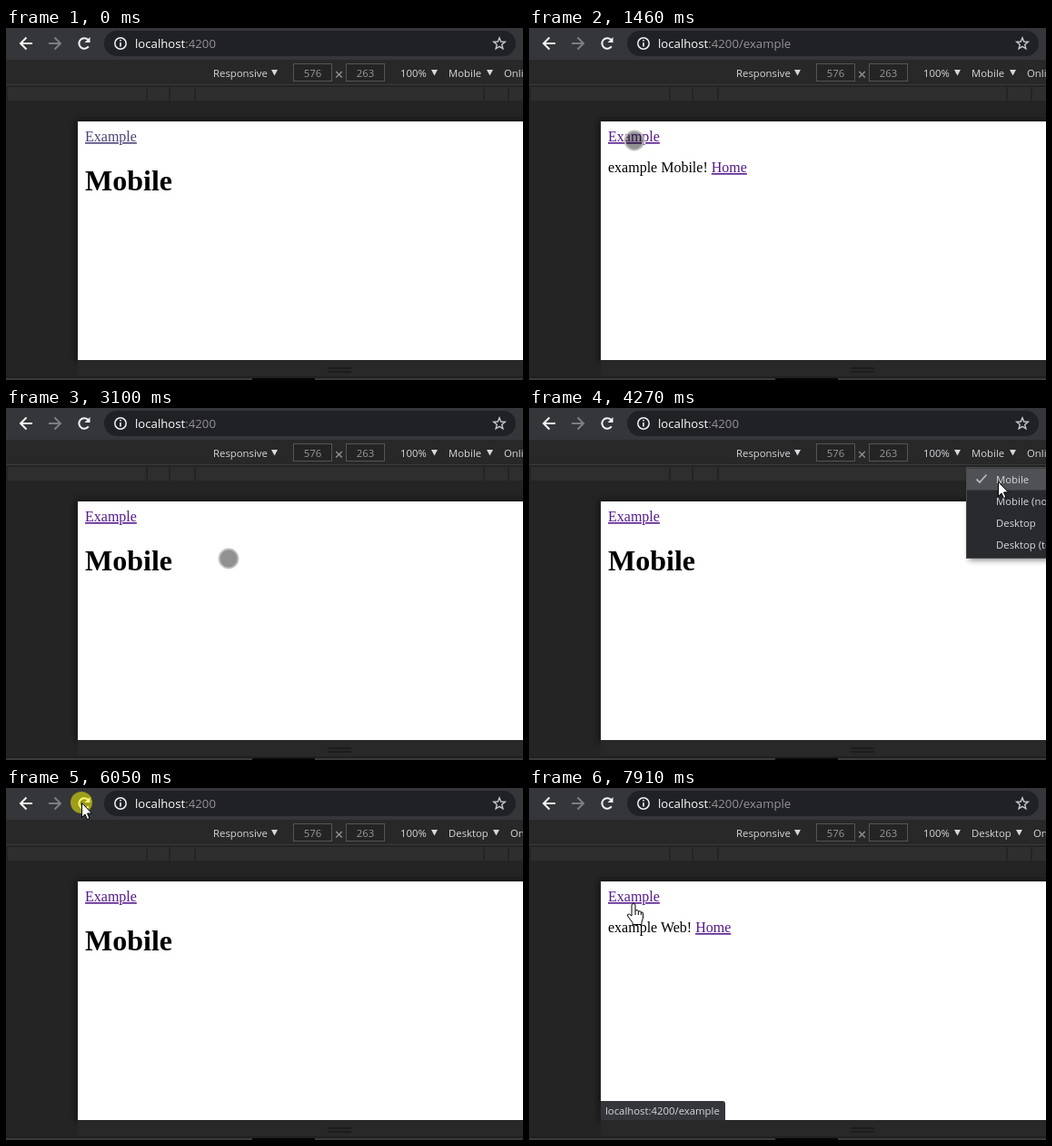
Write an HTML page that moves like this. It is 569 px wide and 388 px high and loops after 8000 ms.

```html
<!DOCTYPE html>
<html lang="en">
<head>
<meta charset="utf-8">
<title>Responsive browser demo</title>
<style>
html, body { margin: 0; width: 100%; height: 100%; overflow: hidden; background: #242424; }
svg { display: block; width: 569px; height: 388px; }
.ui { font: 11.35px "Open Sans", "Noto Sans", sans-serif; fill: #d5d8dc; }
.ui .dim { fill: #96999d; }
.url { font-size: 13.2px; fill: #fff; }
.page { font: 16px "Liberation Serif", "Times New Roman", serif; fill: #000; }
.link { fill: #551a8b; text-decoration: underline; }
.big { font-size: 32px; font-weight: bold; }
</style>
</head>
<body>
<svg viewBox="0 0 569 388" xmlns="http://www.w3.org/2000/svg">
  <defs>
    <filter id="soft" x="-10%" y="-10%" width="120%" height="120%"><feGaussianBlur stdDeviation="3"/></filter>
  </defs>
  <rect width="569" height="388" fill="#242424"/>

  <!-- browser bar -->
  <rect width="569" height="35" fill="#35363a"/>
  <rect x="108" y="3" width="453" height="28" rx="14" fill="#202124"/>
  <g fill="none" stroke="#f1f3f4" stroke-width="2">
    <path d="M29 17H16.5M22.5 10.5L16 17L22.5 23.5"/>
    <path d="M47 17H59.5M53.5 10.5L60 17L53.5 23.5" stroke="#7d7e82"/>
    <path d="M90.8 20.4A5.8 5.8 0 1 1 90.2 12.8"/>
    <path d="M92.5 10V16H86.5Z" fill="#f1f3f4" stroke="none"/>
    <circle cx="126" cy="17" r="6.2" stroke-width="1.5"/>
    <path d="M126 16V20.4M126 13V14.6" stroke-width="1.6"/>
    <path id="star" stroke="#c5c8cc" stroke-width="1.4"/>
  </g>
  <text class="ui url" x="142" y="22" style="font-size:13.2px;fill:#fff">localhost<tspan id="path" fill="#97909b"></tspan></text>

  <!-- device toolbar -->
  <rect y="35" width="569" height="27" fill="#282828"/>
  <rect y="62" width="569" height="1" fill="#3b3b3b"/>
  <g id="ruler" fill="#2e2e2e"></g>
  <g fill="#242424" stroke="#555">
    <rect x="316.5" y="39.5" width="42" height="19"/>
    <rect x="374.5" y="39.5" width="42" height="19"/>
  </g>
  <g class="ui">
    <text x="228" y="54">Responsive</text>
    <text class="dim" x="337.5" y="54" text-anchor="middle">576</text>
    <text class="dim" x="395.5" y="54" text-anchor="middle">263</text>
    <text x="434" y="54">100%</text>
    <text id="device" x="487" y="54"></text>
    <text id="network" y="54">Online</text>
  </g>
  <path d="M363.2 48l6.6 6.6m0-6.6l-6.6 6.6" stroke="#8d9094" stroke-width="1.4"/>
  <g fill="#d5d8dc">
    <path d="M292 46h7l-3.5 6.5Z"/>
    <path d="M468 46h7l-3.5 6.5Z"/>
    <path id="deviceTri" d="M0 46h7l-3.5 6.5Z"/>
  </g>

  <!-- viewport -->
  <rect x="77" y="101" width="510" height="267" fill="#0c0c0c" opacity=".55" filter="url(#soft)"/>
  <rect x="79" y="366" width="490" height="18" fill="#282828"/>
  <path d="M354 375h26m-26 4h26" stroke="#181818" stroke-width="1.6"/>
  <rect y="384" width="569" height="2" fill="#202020"/>
  <rect y="386" width="569" height="2" fill="#3a3a3a"/>
  <rect x="271" y="386" width="69" height="2" fill="#050505"/>
  <rect x="79" y="103" width="490" height="263" fill="#fff"/>
  <g class="page">
    <text id="nav" class="link" x="87" y="125">Example</text>
    <text id="head" class="big" x="87" y="179"></text>
    <text id="para" x="87" y="159"><tspan id="says"></tspan><tspan class="link">Home</tspan></text>
  </g>
  <g id="status">
    <path d="M79 345H213Q216 345 216 348V366H79Z" fill="#35363a"/>
    <text class="ui" x="84" y="360">localhost:4200/example</text>
  </g>

  <!-- device menu -->
  <g id="menu">
    <rect x="484" y="68" width="100" height="100" fill="#000" opacity=".45" filter="url(#soft)"/>
    <rect x="481.5" y="65.5" width="100" height="100" fill="#292a2d" stroke="#4a4b4e"/>
    <rect id="hover" x="482" width="90" height="24" fill="#505154"/>
    <path d="M492.5 78.5l3.5 3.5l7.5-8.5" fill="none" stroke="#b4b6b9" stroke-width="1.8"/>
    <g id="items" class="ui"></g>
  </g>

  <circle id="press" r="12" fill="#ff0" opacity=".52"/>
  <g id="cursor" stroke="#000" stroke-linejoin="round" fill="#fff">
    <circle id="touch" r="10.4" fill="#000" fill-opacity=".43" stroke="#bdbdbd" stroke-opacity=".9" stroke-width="2"/>
    <path id="arrow" d="M.5 .5V16.5L4 13L6.5 18.5L9 17.5L6.5 12H11.5Z"/>
    <g id="hand" transform="translate(-3 -1)">
      <path d="M-2 14V2Q0-2 2 2V8Q5 6.500 5.500 9Q8 8 8.500 10Q10.500 9 10.500 12V16L9 21V23.500H-1V21.500L-6.500 14Q-7 11.500 -4.500 12Z"/>
      <path d="M2 8v5M5.300 9v4M8.300 10v3" fill="none"/>
    </g>
  </g>
</svg>
<script>
const LOOP = 8000;
const $ = id => document.getElementById(id);
const show = (id, on) => $(id).setAttribute("display", on ? "inline" : "none");
const set = (id, text) => { if ($(id).textContent !== text) $(id).textContent = text; };
const within = (t, a, b) => t >= a && t < b;

// Ruler cells mark device widths; each is separated by a two pixel gap.
let left = 2;
$("ruler").innerHTML = [155, 180, 208, 526, 553, 570].map(end => {
  const cell = `<rect x="${left}" y="65" width="${end - 1 - left}" height="15"/>`;
  left = end + 1;
  return cell;
}).join("");
$("items").innerHTML = ["Mobile", "Mobile (no touch)", "Desktop", "Desktop (touch)"]
  .map((s, i) => `<text x="514" y="${83 + i * 24}">${s}</text>`).join("");
$("star").setAttribute("d", "M" + Array.from({ length: 10 }, (_, i) => {
  const a = i * Math.PI / 5, r = i % 2 ? 2.9 : 6.6;
  return `${(543 + r * Math.sin(a)).toFixed(2)} ${(17.4 - r * Math.cos(a)).toFixed(2)}`;
}).join("L") + "Z");

// Each move runs in steps from the last place through evenly timed stops.
const moves = [];
let last = [404, 371];
function move(from, to, steps, ...stops) {
  moves.push({ from, steps, gap: (to - from) / Math.max(1, steps - 1), stops: [last, ...stops] });
  last = stops[stops.length - 1];
}
move(70, 520, 7, [177, 243], [117, 105]);
move(670, 1000, 5, [110, 113], [116, 124]);
move(1540, 2010, 7, [95, 216], [200, 228], [252, 187]);
move(2080, 2320, 4, [225, 159]);
move(2790, 3500, 10, [197, 172], [245, 166], [420, 122], [511, 64]);
move(3650, 3650, 1, [512, 54]);
move(4190, 4650, 7, [519, 101], [520, 130]);
move(5120, 5820, 10, [177, 99], [54, 28], [83, 16]);
move(6210, 6760, 8, [172, 132], [265, 223]);
move(7140, 7450, 5, [122, 118]);
move(7600, 7600, 1, [118, 128]);

function pointer(t) {
  const m = moves.filter(v => t >= v.from - 6).pop();
  if (!m) return null;
  const step = m.gap ? Math.floor((t - m.from + 6) / m.gap) : 0;
  const legs = m.stops.length - 1;
  const u = Math.min(1, (step + 1) / m.steps) * legs;
  const i = Math.min(legs - 1, Math.floor(u));
  return m.stops[i].map((v, axis) => v + (m.stops[i + 1][axis] - v) * (u - i));
}

const presses = [[1230, 1380], [2470, 2620], [3730, 3880], [4800, 4970], [6050, 6140], [7680, 7910]];

function draw(t) {
  const onExample = within(t, 1310, 2550) || t >= 7760;
  const web = t >= 6370;
  const desktop = t >= 4970;

  set("path", onExample ? ":4200/example" : ":4200");
  set("device", desktop ? "Desktop" : "Mobile");
  $("network").setAttribute("x", desktop ? 555 : 548);
  $("deviceTri").setAttribute("transform", `translate(${desktop ? 536 : 529})`);
  set("head", web ? "Web" : "Mobile");
  set("says", `example ${web ? "Web" : "Mobile"}! `);
  show("head", !onExample);
  show("para", onExample);
  $("nav").style.fill = t < 1310 ? "#4b4478" : "#551a8b";
  show("status", t >= 7600);
  show("menu", within(t, 3800, 4970));

  const p = pointer(t);
  show("cursor", p);
  show("press", p && presses.some(([a, b]) => within(t, a, b)));
  if (!p) return;
  const [x, y] = p;
  const at = `translate(${x.toFixed(1)} ${y.toFixed(1)})`;
  $("cursor").setAttribute("transform", at);
  $("press").setAttribute("transform", at);
  $("hover").setAttribute("y", 66.5 + 24 * Math.max(0, Math.floor((y - 66.5) / 24)));

  const touch = !web && x > 79 && y > 103 && !within(t, 3650, 5114);
  const hand = web && within(x, 87, 145) && within(y, 111, 130);
  show("touch", touch);
  show("hand", hand);
  show("arrow", !touch && !hand);
}

const start = performance.now();
function frame() {
  draw((performance.now() - start) % LOOP);
  requestAnimationFrame(frame);
}
frame();
</script>
</body>
</html>
```
